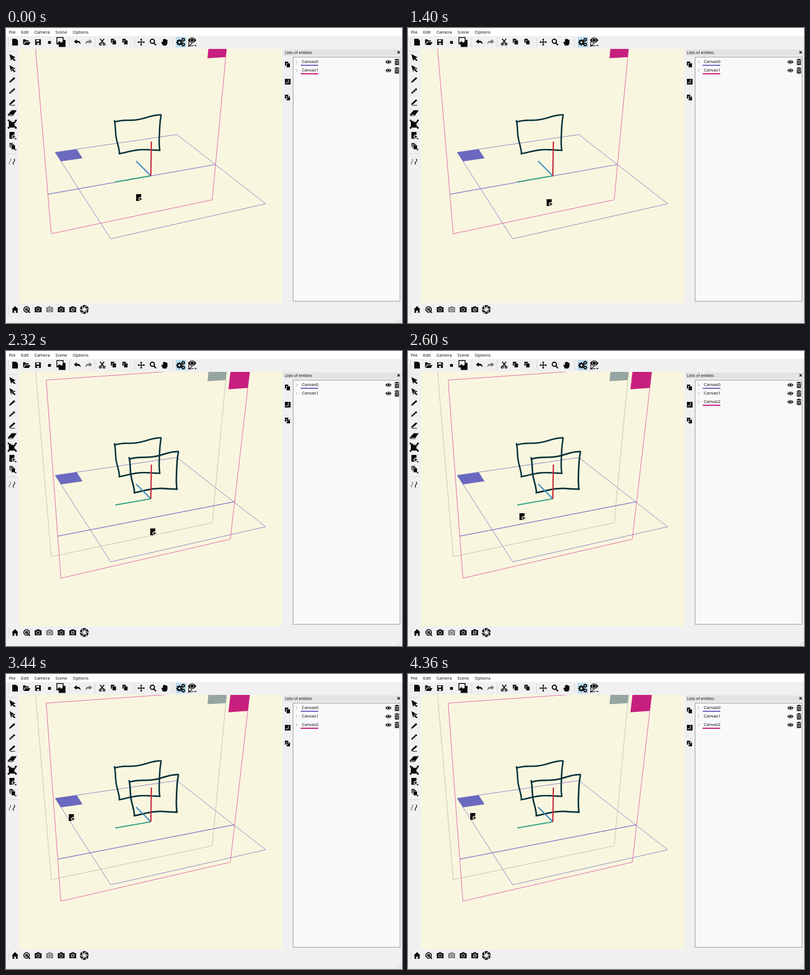
Recreate the animation shown at these times as an HTML page with a canvas. Size 700 px wide and 522 px high, loop 4400 ms.

```html
<!DOCTYPE html>
<html lang="en">
<head>
<meta charset="utf-8">
<title>Canvas cloning</title>
<style>
html, body { margin: 0; width: 100%; height: 100%; overflow: hidden; background: #f0f0f0; }
canvas { display: block; }
</style>
</head>
<body>
<canvas id="stage" width="700" height="522"></canvas>
<script>
const g = document.getElementById('stage').getContext('2d');
const LOOP = 4400, CLONE_AT = 2320, LIST_AT = 2400;
const INK = '#080808', BAR = '#f0f0f0', PAPER = '#f9f6df';
const BLUE = { flag: '#6b69bf', edge: '#8b88ca' };
const PINK = { flag: '#c71f7e', edge: '#df6aa4' };
const GRAY = { flag: '#97a5a2', edge: '#c4c3b9' };

// ---- drawing helpers ----

function rect(x, y, w, h, color = INK) {
  g.fillStyle = color;
  g.fillRect(x, y, w, h);
}

const square = (x, y, r, color) => rect(x - r, y - r, 2 * r, 2 * r, color);

function trace(pts, closed) {
  g.beginPath();
  pts.forEach(([x, y]) => g.lineTo(x, y));
  if (closed) g.closePath();
}

function line(pts, color = INK, width = 1, closed = false) {
  trace(pts, closed);
  g.strokeStyle = color;
  g.lineWidth = width;
  g.stroke();
}

function poly(pts, color = INK) {
  trace(pts, true);
  g.fillStyle = color;
  g.fill();
}

function ring(x, y, r, width = 1, color = INK) {
  g.beginPath();
  g.arc(x, y, r, 0, 7);
  g.strokeStyle = color;
  g.lineWidth = width;
  g.stroke();
}

function disc(x, y, r, color = INK) {
  g.beginPath();
  g.arc(x, y, r, 0, 7);
  g.fillStyle = color;
  g.fill();
}

function shape(x, y, d, color = INK, flip = 1) {
  g.save();
  g.translate(x, y);
  g.scale(flip, 1);
  g.fillStyle = color;
  g.fill(new Path2D(d), 'evenodd');
  g.restore();
}

function plus(x, y, r, width, color = INK) {
  rect(x - r, y - width / 2, 2 * r, width, color);
  rect(x - width / 2, y - r, width, 2 * r, color);
}

function text(s, x, y, size) {
  g.font = size + 'px "Open Sans", "Noto Sans", sans-serif';
  g.fillStyle = '#000';
  g.fillText(s, x, y);
  return g.measureText(s).width;
}

const lerp = (a, b, k) => a + (b - a) * k;
const mix = (p, q, k) => [lerp(p[0], q[0], k), lerp(p[1], q[1], k)];

// ---- icons, each centred on x, y ----

const page = (x, y) => shape(x, y, 'M-5-6H2L5-3V6H-5Z');
const arrow = (x, y) => shape(x, y, 'M-5-6L6 0L2 1.5L6 5L4 6.5L0 3L-2 6Z');
const pencil = (x, y) => shape(x, y, 'M-5.5 5.5L-4.5 2.5L3-4.5L5.5-2.5L-2.5 4.5Z');
const folder = (x, y) => shape(x, y, 'M-6 5V-5H-2L-1-3H4V-1H-3ZM-2 0H7L4 5H-5Z');
const home = (x, y) => shape(x, y, 'M-6 0L0-6L6 0H4.5V6H1.5V2H-1.5V6H-4.5V0Z');
const hand = (x, y) => shape(x, y, 'M-3 6L-6 0L-4-1L-3 1V-5H-1V-6H1V-5H3V-4H5V2L3 6Z');
const undo = (x, y, color = INK, flip = 1) => shape(x, y, 'M-6-1L-1-5V-2.5C4-3 6 0 6 4C4 1 2 0.5-1 1V3Z', color, flip);
const redo = (x, y) => undo(x, y, '#777', -1);
const more = (x, y) => poly([[x - 2, y], [x + 2, y], [x, y + 2.5]]);

function addPage(x, y, back = BAR) {
  rect(x - 5, y - 6, 9, 12);
  plus(x + 2.5, y + 2.5, 3.5, 3.6, back);
  plus(x + 2.5, y + 2.5, 2.7, 1.4);
}

function copies(x, y, n = 2) {
  for (let i = 0; i < n; i++) {
    const d = i * 6 / n - 5;
    square(x + d + 3.5, y + d + 3, 4.5, BAR);
    rect(x + d, y + d - 1, 6, 7);
  }
}

function save(x, y) {
  square(x, y, 5);
  rect(x - 3, y - 4, 5, 3, BAR);
  rect(x - 2, y + 1.5, 4, 3, BAR);
}

function exportView(x, y) {
  rect(x - 4, y - 4, 12, 12.5);
  rect(x - 8, y - 9, 12.5, 13);
  rect(x - 6.5, y - 7.5, 9.5, 9, BAR);
  poly([[x - 6.5, y + 2], [x - 3, y - 2], [x, y + 1], [x + 3, y - 1], [x + 3, y + 2]]);
}

function scissors(x, y) {
  for (const s of [-1, 1]) {
    line([[x + 3.5 * s, y - 6], [x - 2.5 * s, y + 2]], INK, 1.7);
    ring(x + 3.3 * s, y + 3.5, 1.8, 1.4);
  }
}

function move(x, y) {
  plus(x, y, 6, 1.4);
  for (const s of [-1, 1]) {
    poly([[x + 6.5 * s, y], [x + 4 * s, y - 2], [x + 4 * s, y + 2]]);
    poly([[x, y + 6.5 * s], [x - 2, y + 4 * s], [x + 2, y + 4 * s]]);
  }
}

function lens(x, y) {
  ring(x - 1, y - 1.5, 3.7, 2);
  line([[x + 1.7, y + 1.5], [x + 5.5, y + 5.5]], INK, 2.2);
}

function gear(x, y, r) {
  for (let i = 0; i < 8; i++) {
    const a = i * Math.PI / 4;
    line([[x, y], [x + r * Math.cos(a), y + r * Math.sin(a)]], INK, r * 0.38);
  }
  disc(x, y, r * 0.78);
  disc(x, y, r * 0.35, '#bfe1f5');
}

function gears(x, y) {
  square(x, y, 9, '#a9d5ee');
  square(x, y, 8, '#bfe1f5');
  gear(x - 2.5, y + 0.5, 5.6);
  for (const s of [-1, 1]) gear(x + 4.3, y + 4.2 * s, 3.5);
}

function eye(x, y, r = 5.5) {
  g.beginPath();
  g.moveTo(x - r, y);
  g.quadraticCurveTo(x, y - r * 1.3, x + r, y);
  g.quadraticCurveTo(x, y + r * 1.3, x - r, y);
  g.fillStyle = INK;
  g.fill();
  ring(x, y, r * 0.45, 1, BAR);
}

function viewAxes(x, y) {
  eye(x, y - 3.5, 7.5);
  line([[x - 6, y - 1], [x - 6, y + 7], [x, y + 2], [x - 6, y + 7], [x + 3, y + 6]], INK, 1.2);
  more(x + 6, y + 5);
}

function trash(x, y) {
  rect(x - 1.5, y - 5.5, 3, 1.5);
  rect(x - 4, y - 4.5, 8, 1.5);
  rect(x - 3.5, y - 2, 7, 7.5);
  for (const s of [-1, 1]) rect(x + 1.3 * s - 0.5, y - 1, 1, 5, '#fff');
}

function dottedArrow(x, y) {
  arrow(x, y);
  line([[x - 3, y + 5], [x + 4, y - 3]], BAR);
}

function dottedPencil(x, y) {
  pencil(x, y);
  for (const d of [0, 3]) line([[x - 3 + d, y - d], [x + 1 + d, y + 4 - d]], BAR);
}

function linePencil(x, y) {
  pencil(x, y);
  rect(x - 4, y + 5.5, 9, 1);
}

function eraser(x, y) {
  poly([[x - 8, y + 3], [x - 1, y - 5], [x + 8, y - 5], [x + 1, y + 5], [x - 7, y + 5]]);
  line([[x - 6, y + 3.5], [x + 1, y + 3.5]], BAR);
}

function transform(x, y) {
  square(x, y, 6);
  rect(x - 2, y - 6, 6, 2, BAR);
  rect(x + 4, y - 2, 2, 5, BAR);
  for (const i of [-1, 1]) for (const j of [-1, 1]) square(x + 6.5 * i, y + 6.5 * j, 1.5);
}

function addMenu(x, y) {
  addPage(x, y);
  more(x + 6, y + 5);
}

function copyMenu(x, y) {
  copies(x, y, 3);
  more(x + 6, y + 5);
}

function camera(x, y, color = INK) {
  rect(x - 6, y - 4, 12, 9, color);
  rect(x - 2.5, y - 5.5, 5, 2, color);
  ring(x, y + 0.5, 2.8, 1, BAR);
}

const grayCamera = (x, y) => camera(x, y, '#7c7c7c');

function lockedCamera(x, y) {
  camera(x, y);
  line([[x - 2.5, y + 3], [x + 2.5, y - 2]], BAR);
}

function homeLens(x, y) {
  ring(x, y, 4.8, 1.8);
  square(x, y, 2.3);
  line([[x + 2, y + 2], [x + 6, y + 6]], INK, 1.8);
}

function aperture(x, y) {
  const at = (r, a) => [x + r * Math.cos(a), y + r * Math.sin(a)];
  const hub = [];
  disc(x, y, 7.8);
  for (let i = 0; i < 6; i++) {
    const a = i * Math.PI / 3;
    hub.push(at(3.2, a));
    line([at(3.2, a), at(8, a + 1.15)], BAR, 1.3);
  }
  poly(hub, BAR);
}

function curves(x, y) {
  for (const [dx, color] of [[-4, '#777'], [3, INK]]) {
    const pts = [];
    for (let k = -5; k <= 5; k++) pts.push([x + dx - 1.6 * Math.sin(k * 0.6), y + k]);
    line(pts, color, 1.2);
  }
}

const row = (icons, x, y, dx, dy = 0) => icons.forEach((icon, i) => icon(x + i * dx, y + i * dy));

function grip(x, y, dx, dy) {
  row(Array(7).fill((px, py) => rect(px, py, 1, 1, '#b4b4b4')), x, y, dx, dy);
}

// ---- window ----

function bars() {
  rect(0, 0, 700, 14, '#fff');
  let x = 5;
  for (const s of ['File', 'Edit', 'Camera', 'Scene', 'Options']) x += text(s, x, 10, 7.5) + 10;

  rect(0, 14, 700, 23, BAR);
  [4, 112, 157, 227, 294].forEach(gx => grip(gx, 17, 0, 2.5));
  row([page, folder, save, (px, py) => square(px, py + 0.5, 2.5), exportView], 16, 25, 20.3);
  row([undo, redo], 126, 25, 20.3);
  row([scissors, copies, copies], 170, 25, 20.4);
  row([move, lens, hand], 239, 25, 20.7);
  row([gears, viewAxes], 309, 25, 20);

  rect(0, 37, 23, 450, BAR);
  grip(3, 41, 2.5, 0);
  grip(3, 222, 2.5, 0);
  row([arrow, dottedArrow, pencil, dottedPencil, linePencil, eraser, transform, addMenu, copyMenu], 11, 52, 0, 19.7);
  curves(11, 236.5);

  rect(0, 487, 700, 35, BAR);
  grip(4, 490, 0, 2.5);
  row([home, homeLens, camera, grayCamera, camera, lockedCamera, aperture], 16, 498, 20.4);
  for (let i = 0; i < 3; i++)
    for (let j = 0; j <= i; j++) rect(697 - j * 2.5, 514 + i * 2.5, 1, 1, '#bbb');
}

function tabIcons() {
  copies(498, 65.5);
  square(498, 95, 5);
  line([[494, 97], [499, 97], [499, 91]], BAR);
  copies(498, 124);
  line([[495, 127], [501, 121]], BAR);
}

function dock(cloned, listed) {
  rect(488, 37, 212, 450, BAR);
  rect(491, 38, 208, 11, '#e3e3e3');
  text('Lists of entities', 493, 46, 6.9);
  for (const s of [-2, 2]) line([[692, 43 - s], [696, 43 + s]], INK, 1.2);
  rect(507, 51, 190, 433, '#9a9a9a');
  rect(508, 52, 188, 431, '#f9f9fb');
  tabIcons();
  const marks = [BLUE, cloned ? null : PINK];
  if (listed) marks.push(PINK);
  marks.forEach((mark, i) => {
    const y = 60 + i * 15;
    line([[512.5, y - 2.5], [515, y], [512.5, y + 2.5]], '#aaa');
    text('Canvas' + i, 523, y + 2, 7.5);
    if (mark) rect(521, y + 5, 31, 2, mark.flag);
    eye(676, y);
    trash(691, y);
  });
}

// ---- scene ----

const ground = [[87, 220], [302, 188.5], [459, 311], [185, 373]];
const wall = [[52, 34], [392, 14.5], [364.5, 304], [80, 364]];
const copy = [[71, 51.5], [432, 26], [396.5, 333], [97, 402]];

// Outline with a colour flag in the corner c; a and b are its neighbours.
function plane(corners, { flag, edge }, [c, a, b], wide, high) {
  line(corners, edge, 1, true);
  const p = corners[c], q = mix(p, corners[a], wide), r = mix(p, corners[b], high);
  poly([p, q, [q[0] + r[0] - p[0], q[1] + r[1] - p[1]], r], flag);
}

const upright = (corners, colors) => plane(corners, colors, [1, 0, 2], 0.095, 0.128);

const fold = c => line([mix(c[0], c[3], 0.788), mix(c[1], c[2], 0.784)], '#7875c6', 1.2);

// Hand-drawn side: a straight run with a bow and a wave across it.
function side(a, b, bow, wave) {
  const flat = Math.abs(b[0] - a[0]) > Math.abs(b[1] - a[1]);
  const pts = [];
  for (let t = 0; t <= 1.001; t += 0.05) {
    const p = mix(a, b, t);
    p[flat ? 1 : 0] += bow * Math.sin(Math.PI * t) + wave * Math.cos(7.4 * (t - 0.07));
    pts.push(p);
  }
  line(pts, '#06313a', 2.6);
}

function sketch() {
  g.lineCap = g.lineJoin = 'round';
  side([193, 167.5], [274, 155], -1, -1.8);
  side([191, 164], [200, 222], 0, 0.8);
  side([274.5, 155], [272, 216], -2.4, -0.4);
  side([200, 222], [272, 216], -3, 0.5);
  g.lineCap = 'butt';
  g.lineJoin = 'miter';
}

function scene(cloned) {
  rect(23, 37, 465, 450, PAPER);
  g.save();
  g.beginPath();
  g.rect(23, 37, 465, 450);
  g.clip();

  plane(ground, BLUE, [0, 1, 3], 0.177, 0.105);
  upright(wall, cloned ? GRAY : PINK);
  sketch();
  if (cloned) {
    upright(copy, PINK);
    g.save();
    g.translate(218, 190);
    g.scale(1.055, 1.06);
    g.translate(-192, -165);
    sketch();
    g.restore();
  }
  fold(cloned ? copy : wall);

  const origin = [256, 261.5];
  line([[193, 272.5], origin], '#35a488', 2);
  line([[230, 235.5], origin], '#3587bd', 2);
  line([[257, 201], origin], '#c92a3e', 2.3);
  g.restore();
}

// Pointer stops as [time, x, y]; straight runs between them.
const stops = [
  [0, 235, 300], [1200, 235, 300], [1400, 250, 309], [1800, 260, 320],
  [2400, 260, 320], [2900, 116, 254], [3480, 116, 254], [LOOP, 115, 252]
];

function pointer(t) {
  const i = stops.findIndex(s => s[0] > t);
  const [t0, ...from] = stops[i - 1], [t1, ...to] = stops[i];
  return mix(from, to, (t - t0) / (t1 - t0)).map(Math.round);
}

function draw(t) {
  const cloned = t >= CLONE_AT;
  scene(cloned);
  bars();
  dock(cloned, t >= LIST_AT);
  addPage(...pointer(t), PAPER);
}

const start = performance.now();
function tick() {
  draw((performance.now() - start) % LOOP);
  requestAnimationFrame(tick);
}
tick();
</script>
</body>
</html>
```
